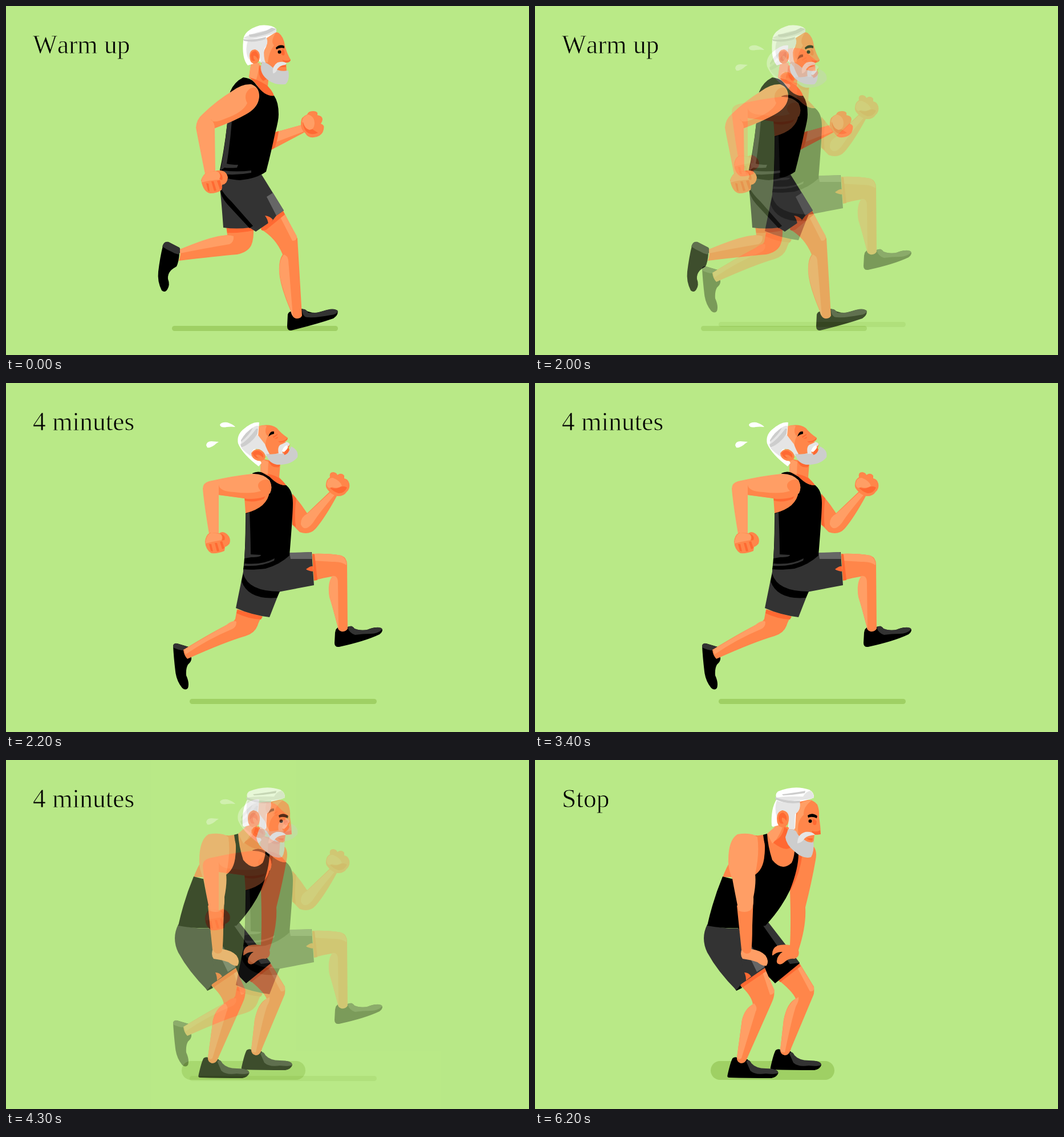
Recreate the animation shown at these times as an HTML page. Size 917 by 611 pixels, loop 7.4 s.

```html
<!DOCTYPE html>
<html lang="en">
<head>
<meta charset="utf-8">
<title>Running workout</title>
<style>
html, body { margin: 0; height: 100%; overflow: hidden; background: #b9e987; }
svg { display: block; width: 100%; height: 100%; }
/* The background-coloured outline thins the letters. */
text { font: 45.5px "Liberation Serif", "Times New Roman", serif; font-kerning: none; stroke: #b9e987; stroke-width: .8px; }
.bg { fill: #b9e987; }
.shade { fill: #9fd064; }
.skin { fill: #ff864a; }
.lit { fill: #ff9e65; }
.deep { fill: #ff6932; }
.coal { fill: #333; }
.ash { fill: #666; }
.snow { fill: #fff; }
.fog { fill: #e5e5e5; }
.silver { fill: #cdcdcd; }
</style>
</head>
<body>
<svg viewBox="0 0 917 611">
<g class="scene">
  <rect class="bg" width="917" height="611"/>
  <rect class="shade" x="291" y="560" width="291" height="9" rx="4.5"/>
  <!-- far arm -->
  <path class="skin" d="M472 221L519 208Q530 215 522 222L465 252Z"/>
  <path class="lit" d="M476 220L519 208L524 219L474 238Z"/>
  <path class="deep" d="M472 221L478 219Q476 236 471 248L465 252Z"/>
  <path class="skin" d="M517 204Q517 194 528 190Q530 183 540 184Q548 185 546 191Q555 192 555 199Q554 204 552 206Q559 208 557 216Q555 226 545 229Q530 233 525 223Q516 216 517 204Z"/>
  <path class="deep" d="M521 203Q523 217 536 215L547 222Q533 228 525 218Q520 210 521 203Z"/>
  <path class="lit" d="M519 204Q519 193 530 190Q541 193 541 206Q540 217 532 217Q524 215 521 203Z"/>
  <!-- back leg -->
  <path d="M275 420Q277 412 284 413L304 423Q307 428 304 433Q303 448 299 456Q292 460 289 463Q283 470 284 478Q288 488 283 496Q279 503 273 498Q265 482 267 465Q270 440 275 420Z"/>
  <path class="coal" d="M274 421Q277 411 285 413L304 423Q307 429 303 435Q296 434 290 430Q282 427 274 421Z"/>
  <path class="skin" d="M386 386L434 386Q435 408 430 419Q424 431 405 435Q370 438 303 446Q307 436 305 426Q360 405 388 401Z"/>
  <path class="lit" d="M305 426Q355 405 378 402Q392 400 399 403Q400 413 392 417Q350 424 305 433Z"/>
  <path class="deep" d="M387 388L434 386L434 393Q410 398 388 397Z"/>
  <!-- front leg -->
  <path d="M494 540Q496 534 503 535L519 530Q533 538 545 537L560 533Q575 529 581 533Q584 540 574 547Q545 557 500 568Q493 569 493 560Z"/>
  <path class="coal" d="M519 531Q525 529 530 537Q545 538 556 534Q575 527 582 534Q580 540 570 541Q545 546 530 545Q520 546 519 531Z"/>
  <path class="skin" d="M447 391L450 380L484 355Q500 385 511 407L519 542Q517 548 508 547Q502 545 501 538Q480 490 479 465Q478 445 485 435Q473 406 447 391Z"/>
  <path class="lit" d="M487 435Q494 437 495 445L503 543Q500 540 499 532Q480 485 479 462Q479 445 487 435ZM477 362L485 358L510 403Q510 412 502 411Z"/>
  <path class="deep" d="M447 391L450 380L484 355L489 365L456 392L449 393Z"/>
  <!-- shorts -->
  <path class="coal" d="M376 298Q410 309 448 295L487 358L474 367L467 376L460 380L438 395L427 388Q405 391 381 388Q378 345 375 318Z"/>
  <path d="M375 318Q376 334 388 347L427 389L433 385L395 342Q382 330 376 318Z"/>
  <path class="ash" d="M457 334L468 327L487 358L474 367Z"/>
  <path class="deep" d="M454 367Q463 368 468 374L467 376L460 382Q459 373 454 367Z"/>
  <!-- top -->
  <path d="M393 150Q400 133 416 125Q428 126 435 133Q450 154 470 157Q478 168 478 190Q478 200 472 222Q464 260 456 290Q440 302 410 305Q385 303 375 297L375 287Q383 250 388 205Z"/>
  <path class="coal" d="M388 205L396 201Q393 240 387 276Q395 278 407 278L405 283Q390 284 383 283L376 288Q384 245 388 205ZM381 288Q405 291 430 288L430 292Q403 297 377 294Z"/>
  <!-- neck -->
  <path class="skin" d="M430 98L462 110L459 140L469 157Q452 154 438 136Q431 129 426 125Z"/>
  <path class="lit" d="M430 98L445 100Q442 120 438 131L426 125Z"/>
  <path class="deep" d="M426 125Q440 128 456 138Q466 146 470 157Q454 159 440 139Q435 131 426 125ZM444 103Q447 120 459 127L451 131Q441 124 444 103Z"/>
  <!-- head -->
  <path class="skin" d="M452 56Q467 43 478 47Q487 54 489 69Q492 82 499 94Q498 99 491 99L492 113Q475 122 455 118Q440 100 452 56Z"/>
  <path class="lit" d="M456 56Q462 49 473 47Q463 62 470 69Q461 80 459 99L451 99Z"/>
  <path class="snow" d="M416 60Q417 42 445 34Q465 32 474 40L474 45Q462 53 454 58Q460 66 454 75Q448 88 452 98L444 97Q443 80 430 82L434 101L424 104Q413 92 416 60Z"/>
  <path class="fog" d="M424 61Q440 61 457 56Q461 66 453 74Q451 90 455 99L446 99Q446 76 434 76Q427 80 426 94Q418 80 424 61ZM416 56Q435 45 474 40L474 46Q458 53 440 56Q425 60 416 56Z"/>
  <path class="silver" d="M416 58Q435 60 456 54L455 58Q435 65 417 61ZM426 50Q450 48 466 38L474 40Q462 49 446 52Q436 55 427 54Z"/>
  <path class="skin" d="M427 88Q427 76 437 76Q446 79 445 90Q444 102 434 101Q427 99 427 88Z"/>
  <path class="deep" d="M429 87Q430 78 438 79Q445 85 442 94Q438 86 434 87Q433 92 437 95Q433 98 430 94Z"/>
  <path class="silver" d="M449 97Q458 99 468 108Q480 116 495 113Q498 130 490 137Q472 139 460 130Q446 120 447 106Z"/>
  <path class="skin" d="M476 103H491V112H478Z"/>
  <path class="deep" d="M477 104L490 103L491 107L478 107ZM484 94Q492 97 499 94Q499 100 488 99ZM485 75Q490 79 488 86Q484 88 482 82Z"/>
  <path class="fog" d="M468 118Q466 105 476 99Q486 96 492 100L490 103Q480 104 476 110Q473 118 468 118Z"/>
  <path d="M473 73Q480 66 488 70L488 74Q480 72 474 76Z"/>
  <circle cx="479.500" cy="80.500" r="3"/>
  <!-- near arm -->
  <path class="lit" d="M395 150Q413 136 430 137Q444 142 444 158Q443 176 425 187Q400 202 366 214L367 290Q375 300 349 294Q338 240 333 213Q334 198 345 189Q370 165 395 150Z"/>
  <path class="skin" d="M421 153Q428 139 439 144Q446 155 442 166Q438 180 420 190Q395 203 366 214Q366 204 359 198Q362 207 385 197Q416 186 423 170Q418 161 421 153Z"/>
  <path class="skin" d="M342 305Q346 294 352 292L370 288Q386 286 389 300Q388 312 379 313L378 322Q370 328 358 328Q346 326 342 305Z"/>
  <path class="lit" d="M343 304Q346 293 355 291L368 289Q378 292 375 304Q355 305 343 309Z"/>
  <path class="deep" d="M351 310l4 1l2 14l-3 -2ZM360 307l4 0l5 16l-4 1ZM370 306l5 -1l4 14l-4 2ZM373 290Q382 297 379 305L374 303Q378 297 373 290Z"/>
</g>

<g class="scene">
  <rect class="bg" width="917" height="611"/>
  <rect class="shade" x="322" y="553" width="328" height="9" rx="4.5"/>
  <path class="snow" d="M375 73Q378 68 388 69Q398 72 402 77Q395 76 387 77Q376 79 375 73ZM351 109Q352 102 360 102L373 103Q368 106 365 109Q358 114 353 113Z"/>
  <!-- far arm -->
  <path class="skin" d="M502 194Q515 208 528 228L571 187L580 198Q560 235 543 255Q532 267 515 261L502 248Z"/>
  <path class="lit" d="M517 248Q516 235 528 229L572 188L577 195Q550 226 538 245Q524 262 517 248Z"/>
  <path class="deep" d="M502 194L509 202Q505 230 508 252L502 248Z"/>
  <path class="skin" d="M561 177Q562 168 568 165Q566 156 574 156Q580 157 581 161Q588 156 593 162L593 167Q600 168 602 176Q604 185 597 191Q592 199 580 198Q570 195 565 188Q560 183 561 177Z"/>
  <path class="deep" d="M566 181Q575 187 584 183Q592 179 598 183Q594 193 583 193Q573 190 566 181Z"/>
  <path class="lit" d="M562 177Q564 165 573 166Q586 171 589 180Q580 186 572 182Q564 187 562 177Z"/>
  <!-- back leg -->
  <path d="M293 460Q294 456 300 456L320 462L325 481Q326 487 319 493Q315 500 316 512Q322 525 319 534Q315 539 309 534Q299 522 297 505Q294 480 293 460Z"/>
  <path class="coal" d="M293 460Q294 455 300 456L320 462Q314 464 311 468Q303 468 293 463Z"/>
  <path class="skin" d="M405 396L449 408Q443 418 441 425Q436 438 420 443Q385 453 318 483Q312 477 311 467Q355 440 386 424Q400 418 402 413Z"/>
  <path class="lit" d="M312 467Q355 441 386 424Q398 414 404 418Q404 428 396 431Q355 448 315 475Z"/>
  <path class="deep" d="M406 397L450 409L447 414Q425 413 404 403Z"/>
  <!-- front leg -->
  <path d="M577 437Q578 429 584 427L599 427Q606 424 611 430Q620 434 632 433Q645 426 658 429Q663 434 655 440Q630 452 584 462Q576 463 576 455Z"/>
  <path class="coal" d="M599 428Q606 422 611 430Q625 435 640 430Q655 425 660 431Q652 439 640 439Q625 439 612 441Q602 438 599 428Z"/>
  <path class="skin" d="M537 299Q565 298 588 302Q598 306 598 318L599 430Q596 436 588 435Q582 433 582 428L567 372Q564 350 576 338Q556 341 540 346Z"/>
  <path class="lit" d="M537 299Q565 298 588 302Q598 308 597 319Q588 312 572 313L538 311ZM572 338Q582 336 582 350L583 432Q578 410 567 375Q563 350 572 338Z"/>
  <path class="deep" d="M537 299L541 300L546 345L540 346Z"/>
  <!-- shorts -->
  <path class="coal" d="M416 330L480 364L462 410Q430 406 403 394Z"/>
  <path class="coal" d="M416 325L470 318L497 298L536 296L540 354L477 366Q430 366 416 345Z"/>
  <path d="M416 334Q425 365 480 365L475 376Q425 380 413 347Z"/>
  <path class="ash" d="M497 297L535 296L537 308L499 308Z"/>
  <path class="deep" d="M526 326Q534 320 538 321L539 330Q530 329 526 326Z"/>
  <!-- top -->
  <path d="M432 158Q445 151 463 163Q480 176 490 178Q503 187 503 210Q503 230 497 302Q480 318 455 325Q430 328 416 326Q420 300 420 228L450 190Z"/>
  <path class="coal" d="M420 229L427 226Q429 270 429 300L447 301Q447 305 430 305Q425 306 418 307Q421 270 420 229ZM418 316Q450 319 471 307L470 311Q448 322 417 320Z"/>
  <!-- neck -->
  <path class="skin" d="M447 132L481 140L479 165L491 179Q478 180 462 164L446 155Z"/>
  <path class="lit" d="M447 132L460 138L459 160L446 155Z"/>
  <path class="deep" d="M458 159Q480 162 491 179Q475 180 458 159ZM460 136Q468 142 481 142L479 147Q465 150 460 136Z"/>
  <!-- head -->
  <path class="skin" d="M442 76Q462 70 475 79Q482 88 494 96Q493 101 488 102L498 108L490 128Q470 138 455 122Q440 110 442 76Z"/>
  <path class="lit" d="M442 76Q449 73 457 75Q452 87 459 93Q454 103 455 113L440 93Z"/>
  <path class="snow" d="M407 106Q404 92 415 82Q432 67 444 69L442 92Q430 115 448 140L443 146Q415 125 407 106Z"/>
  <path class="fog" d="M411 108Q415 92 428 82Q440 72 443 76Q442 88 430 99ZM413 114Q430 100 441 90Q446 97 454 107Q458 118 462 124L456 128Q448 112 434 116Q429 121 432 130Q420 122 413 114Z"/>
  <path class="silver" d="M411 108Q424 100 439 80L442 80L441 89Q430 106 413 113ZM412 100Q420 86 433 78Q428 90 412 103Z"/>
  <path class="skin" d="M430 123Q434 115 444 116Q455 121 455 130Q452 138 441 136Q430 132 430 123Z"/>
  <path class="deep" d="M432 123Q437 117 444 119Q453 124 451 131Q444 124 438 126Q440 131 445 132Q436 133 432 123Z"/>
  <path class="silver" d="M456 124Q470 126 480 122Q495 127 500 111Q514 118 511 130Q500 144 475 143Q460 140 456 124Z"/>
  <path class="fog" d="M478 124Q475 109 484 107L492 103Q500 106 496 110L489 112Q484 117 485 124Z"/>
  <path class="snow" d="M484 119Q487 110 493 109Q497 114 487 121Z"/>
  <path class="deep" d="M487 123L495 113L497 117Q494 125 488 126ZM477 102Q488 103 494 96Q494 103 480 104ZM468 94L476 89L476 91L469 96ZM470 98L477 94L476 97Z"/>
  <path d="M460 94Q463 83 470 85L470 89Q464 90 460 94Z"/>
  <!-- near arm -->
  <path class="skin" d="M418 200L455 196L462 190Q459 218 420 228Z"/>
  <path class="deep" d="M418 200L456 196L452 203Q435 210 419 206Z"/>
  <path class="lit" d="M345 185Q345 175 356 172Q400 162 432 159Q450 158 462 170Q468 182 463 193Q445 205 418 202L373 196L373 264Q366 270 356 264Q347 210 345 185Z"/>
  <path class="skin" d="M373 178Q374 190 400 191Q430 195 447 189Q438 180 445 173Q454 166 462 171Q470 186 459 196Q445 205 418 202L373 196Z"/>
  <path class="skin" d="M349 278Q350 266 358 262L374 263Q380 258 388 265Q395 272 392 281Q388 286 384 287L383 294Q372 299 360 298Q350 292 349 278Z"/>
  <path class="lit" d="M350 276Q353 264 360 262L374 264Q381 267 378 275Q365 277 350 281Z"/>
  <path class="deep" d="M356 282l4 0l3 13l-4 -1ZM366 280l4 0l4 14l-4 1ZM375 278l4 -1l4 12l-4 2ZM376 263Q386 268 383 275L378 276Q382 269 376 263Z"/>
</g>

<g class="scene">
  <rect class="bg" width="917" height="611"/>
  <rect class="shade" x="308" y="527" width="217" height="33" rx="16.5"/>
  <!-- far leg -->
  <g id="shoe">
    <path d="M413 538Q418 515 422 508Q426 505 430 507L448 510Q455 518 461 525Q475 529 490 527Q502 528 502 534Q500 541 490 543Q450 543 416 542Q412 542 413 538Z"/>
    <path class="coal" d="M446 514Q450 508 455 517Q463 526 480 526Q502 526 502 534Q495 537 480 535Q462 538 453 530Z"/>
  </g>
  <path class="skin" d="M424 383L464 356L489 397Q490 408 488 412L449 505Q446 517 438 517Q430 515 430 508L436 455Q442 425 457 418Q452 405 424 383Z"/>
  <path class="lit" d="M458 360L464 357L489 398Q490 406 482 405ZM462 415Q463 422 458 430Q452 445 438 512Q430 512 430 507L436 455Q442 425 462 415Z"/>
  <path class="deep" d="M424 383L463 356L466 361L430 389Z"/>
  <path d="M356 294L408 284L464 356L421 391L398 368Z"/>
  <path class="coal" d="M400 290L409 284L464 355L447 357Z"/>
  <!-- far arm -->
  <path class="skin" d="M462 165L489 152Q495 160 492 175Q485 215 474 258Q476 290 462 333Q465 345 455 348Q445 346 436 355Q430 360 425 356Q421 349 430 339Q424 343 416 342Q415 330 425 325Q435 322 447 324Q449 285 447 228Z"/>
  <path d="M416 343Q424 335 434 336Q424 342 424 352Z"/>
  <path class="deep" d="M462 167L469 164Q465 198 449 227L447 228Q448 205 462 167Z"/>
  <!-- near leg -->
  <use href="#shoe" x="-75.500" y="14"/>
  <path class="skin" d="M358 393L403 364L419 403Q421 412 415 425L372 522Q369 531 361 531Q353 528 354 521L363 455Q368 435 382 428Q380 412 358 393Z"/>
  <path class="lit" d="M398 368L403 365L420 403Q419 411 412 411ZM384 426Q391 433 387 440L362 522Q358 526 354 521L363 455Q368 435 384 426Z"/>
  <path class="deep" d="M358 394L403 364L405 370L364 398Z"/>
  <path d="M348 396L353 404L363 399L358 391Z"/>
  <path class="coal" d="M302 288Q330 296 358 295Q385 330 403 364L362 392L353 403Q320 370 302 337Q290 312 302 288Z"/>
  <path class="ash" d="M356 303L361 302L403 362L389 371Z"/>
  <path class="coal" d="M353 298L362 306L377 339L364 360Z"/>
  <path class="deep" d="M367 372Q375 372 379 379L370 386Q370 378 367 372Z"/>
  <!-- torso -->
  <path class="skin" d="M329 205Q336 187 342 178L380 134L412 129L424 112L446 118L462 162Q460 188 437 190L390 205Z"/>
  <path d="M329 204L345 208L387 200Q409 185 400 131L407 129Q408 150 416 175Q433 196 450 180Q454 172 455 160L462 164Q462 190 447 228Q432 260 404 290Q350 299 302 290Q312 245 329 204Z"/>
  <path class="lit" d="M424 114L434 118Q425 140 416 146L407 129Z"/>
  <path class="deep" d="M420 142Q435 134 437 117L443 121Q439 140 449 152Q440 162 418 145Z"/>
  <!-- head -->
  <path class="skin" d="M460 72Q485 65 495 78Q499 88 498 100Q502 125 500 130L490 131L488 147Q460 150 445 120Z"/>
  <path class="lit" d="M463 78Q472 70 486 70Q470 82 471 96Q458 108 462 130L454 122Z"/>
  <path class="snow" d="M415 115Q413 85 424 68Q420 60 426 55Q455 43 481 52Q490 57 489 66Q480 70 464 73Q466 88 458 92L456 120L444 118Q447 90 433 88Q424 92 428 114L417 117Z"/>
  <path class="fog" d="M424 71Q440 78 464 72Q467 88 456 95L455 122L445 121Q447 88 434 88Q426 88 424 100Q419 85 424 71ZM421 66Q440 63 470 64Q475 55 483 54Q489 58 489 66Q478 70 462 70Q440 73 421 66Z"/>
  <path class="silver" d="M421 65Q440 73 465 71L464 75Q440 78 422 69ZM433 60Q450 58 474 54L473 58Q455 61 435 62Z"/>
  <path class="skin" d="M424 103Q424 90 434 88Q446 90 445 104Q444 118 433 118Q424 116 424 103Z"/>
  <path class="deep" d="M427 102Q428 92 435 92Q443 96 441 107Q437 100 433 101Q432 107 436 111Q428 114 427 102Z"/>
  <path class="silver" d="M444 121Q454 121 458 125Q466 143 488 142Q490 160 484 170Q470 174 455 160Q440 148 439 135Z"/>
  <path class="skin" d="M472 136Q482 132 489 136L487 144Q477 145 472 139Z"/>
  <path class="deep" d="M476 137L487 137L486 141Q480 141 476 137ZM486 124Q493 127 500 123L501 130Q490 132 485 128ZM487 103Q496 105 493 113Q488 116 487 110Z"/>
  <path class="fog" d="M460 146Q460 130 474 126Q486 125 491 131Q478 132 473 137Q468 145 460 146Z"/>
  <path d="M478 97Q486 91 495 98L494 102Q486 98 479 101Z"/>
  <circle cx="482.500" cy="107" r="3"/>
  <!-- near arm -->
  <path class="skin" d="M380 132Q402 130 403 150Q404 178 387 200L380 206Z"/>
  <path class="skin" d="M354 255L383 238L381 290Q381 320 379 336L362 332Z"/>
  <path class="lit" d="M339 175Q339 140 355 130Q380 126 390 135Q394 165 386 200Q388 215 383 240Q384 260 376 264Q368 268 357 264Q352 240 346 208Q338 190 339 175Z"/>
  <path class="lit" d="M364 328Q358 340 364 348Q380 350 390 354Q400 362 406 360Q411 352 404 342Q395 333 379 331Q378 339 370 337Z"/>
  <path class="skin" d="M362 329L379 331Q379 339 371 339Q364 338 362 329Z"/>
</g>
<text id="label" x="47" y="83"></text>
</svg>
<script>
const LOOP = 7400, FADE_STEP = 100, STEPS = 3;
const starts = [-FADE_STEP * STEPS, 2000, 4200];
const labels = ["Warm up", "4 minutes", "Stop"];
const scenes = document.querySelectorAll(".scene");
const label = document.getElementById("label");

// Each scene fades over the previous one in thirds; the label cuts at the end.
const mix = (t, start) =>
  Math.max(0, Math.min(1, (Math.floor((t - start) / FADE_STEP) + 1) / STEPS));

function draw() {
  const t = performance.now() % LOOP;
  let current = 0;
  starts.forEach((start, i) => {
    const opacity = mix(t, start);
    scenes[i].setAttribute("opacity", opacity);
    if (opacity === 1) current = i;
  });
  label.textContent = labels[current];
  requestAnimationFrame(draw);
}
draw();
</script>
</body>
</html>
```
